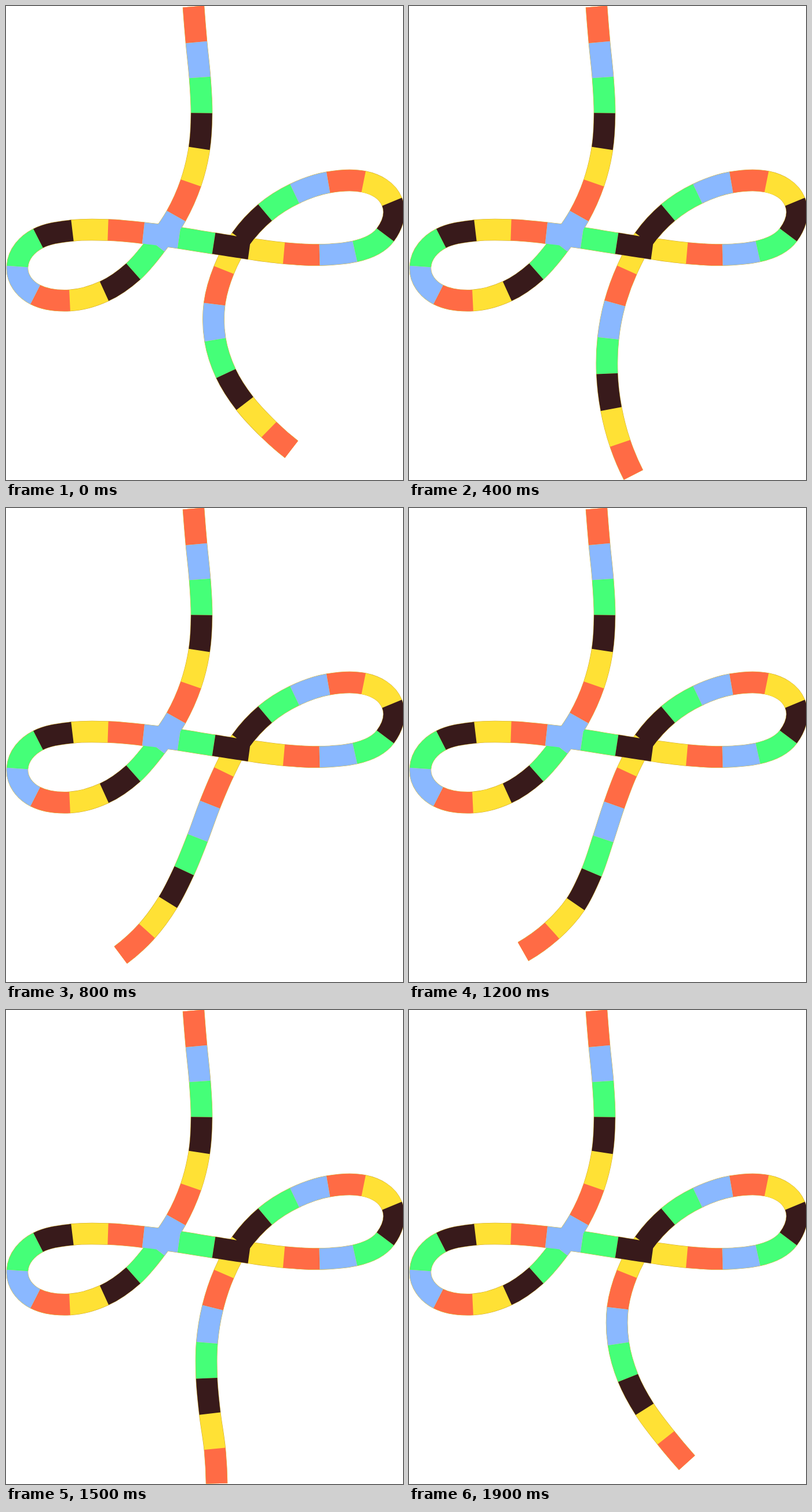
An HTML page that plays this animation: 685x817 px, repeating every 2 s.

```html
<!DOCTYPE html>
<html lang="en">
<head>
<meta charset="utf-8">
<title>Swinging ribbon</title>
<style>
  html, body { margin: 0; width: 100%; height: 100%; overflow: hidden; background: #fff; }
  svg { display: block; width: 100%; height: 100%; }
  path { fill: none; stroke-width: 36.6; }
  .edge { stroke: #c9a227; stroke-width: 37.6; }
</style>
</head>
<body>
<svg id="stage" viewBox="0 0 685 817"></svg>
<script>
const LOOP = 2000, STEP = 100, BLOCK = 61.2;

// Colour joints along the fixed part: x, y and, in tight bends, a heading in degrees.
const body = [
  [323.5, 1], [328.5, 62.5], [334.5, 123], [337.5, 184.5], [333.5, 245.5], [319, 305],
  [293.5, 362], [259, 412], [219.7, 457.5], [169.5, 491.7], [110, 507.5], [50.5, 497.5, 207],
  [19.5, 449, -86], [55.5, 400.5, -27], [114.5, 387], [176, 386], [237, 391.2], [298.5, 399.7],
  [358.5, 409.2], [420, 418.5], [479.5, 426], [541, 429], [602, 423, -12.5], [654.5, 394.5],
  [666, 337.5], [617, 302.7, 191.5], [556, 304], [498, 323.5], [447, 356], [405, 401.6], [376, 455]
];

// Tail poses: time, lean of each block from straight down in degrees, length of the last block.
const right = [-15.5, 1.1, 17.7, 32.3, 42.7, 48.9, 51.7];
const left = [-22.8, -19.8, -22, -29.5, -43.5, -58, 61.6];
const poses = [
  [0, ...right],
  [100, ...right],
  [400, -19.9, -10.8, -1.8, 6.6, 14.6, 22.9, 59],
  [600, -22, -19, -16.5, -13.5, -12.5, -15.2, 59],
  [800, -23.2, -20.3, -22.3, -27.2, -36.3, -47.6, 61.6],
  [900, ...left],
  [1100, ...left],
  [1200, -21.1, -18, -19, -26.7, -41.7, -54.2, 61.6],
  [1500, -18.4, -9.3, -0.5, 5.2, 7.9, 3.2, 60],
  [1900, -15.1, 1.2, 15.7, 28, 36.7, 40.3, 56.4],
  [LOOP, ...right]
];

// Paint order; "every" is the block's place in the five-colour cycle.
const inks = [
  { color: '#ff6b45', every: 0 },
  { color: '#45ff78', every: 2 },
  { color: '#8ab8ff', every: 1 },
  { color: '#381a1b', every: 3 }
];

const stage = document.getElementById('stage');
function addPath(color) {
  const p = document.createElementNS('http://www.w3.org/2000/svg', 'path');
  if (color) p.setAttribute('stroke', color);
  else p.setAttribute('class', 'edge');
  return stage.appendChild(p);
}
const edge = addPath();
const base = addPath('#ffe135');
inks.forEach(ink => { ink.path = addPath(ink.color); });

const rad = deg => deg * Math.PI / 180;
const unit = (x, y) => { const d = Math.hypot(x, y); return [x / d, y / d]; };

function slope(i, k) {
  const a = poses[Math.max(i - 1, 0)], b = poses[Math.min(i + 1, poses.length - 1)];
  return (b[k] - a[k]) / (b[0] - a[0]);
}

function poseAt(t) {
  let i = 0;
  while (i < poses.length - 2 && poses[i + 1][0] <= t) i++;
  const a = poses[i], b = poses[i + 1], span = b[0] - a[0], u = (t - a[0]) / span;
  return a.slice(1).map((v, n) => {
    const k = n + 1;
    if (v === b[k]) return v;
    const w = u * u * (3 - 2 * u);
    return v + (b[k] - v) * w
      + span * u * (1 - u) * ((1 - u) * slope(i, k) - u * slope(i + 1, k));
  });
}

function joints(t) {
  const pose = poseAt(t), last = pose.pop(), pts = body.slice();
  let [x, y] = pts[pts.length - 1];
  pose.forEach((lean, i) => {
    const len = i === pose.length - 1 ? last : BLOCK;
    x += len * Math.sin(rad(lean));
    y += len * Math.cos(rad(lean));
    pts.push([x, y]);
  });
  return pts;
}

// Mirror a heading across a chord, so the end block bends as an arc.
function mirror(h, c) {
  const d = 2 * (h[0] * c[0] + h[1] * c[1]);
  return [d * c[0] - h[0], d * c[1] - h[1]];
}

function headings(pts) {
  const n = pts.length - 1;
  const chord = i => unit(pts[i + 1][0] - pts[i][0], pts[i + 1][1] - pts[i][1]);
  const out = pts.map(([x, y, deg], i) => {
    if (deg !== undefined) return [Math.cos(rad(deg)), Math.sin(rad(deg))];
    if (i === 0 || i === n) return null;
    return unit(pts[i + 1][0] - pts[i - 1][0], pts[i + 1][1] - pts[i - 1][1]);
  });
  out[0] = mirror(out[1], chord(0));
  out[n] = mirror(out[n - 1], chord(n - 1));
  return out;
}

const fmt = (x, y) => x.toFixed(2) + ' ' + y.toFixed(2) + ' ';

function curve(p, q, hp, hq) {
  const dx = q[0] - p[0], dy = q[1] - p[1], c = Math.hypot(dx, dy);
  const reach = h => 2 * c / (3 * (1 + (h[0] * dx + h[1] * dy) / c));
  const a = reach(hp), b = reach(hq);
  return 'C' + fmt(p[0] + hp[0] * a, p[1] + hp[1] * a)
    + fmt(q[0] - hq[0] * b, q[1] - hq[1] * b) + fmt(q[0], q[1]);
}

function draw(t) {
  const pts = joints(t), dirs = headings(pts);
  const move = i => 'M' + fmt(pts[i][0], pts[i][1]);
  const blocks = pts.slice(1).map((q, i) => curve(pts[i], q, dirs[i], dirs[i + 1]));
  const whole = move(0) + blocks.join('');
  edge.setAttribute('d', whole);
  base.setAttribute('d', whole);
  for (const { path, every } of inks) {
    path.setAttribute('d', blocks.map((b, i) => i % 5 === every ? move(i) + b : '').join(''));
  }
}

const start = performance.now();
let shown = -1;
function tick(now) {
  const t = Math.floor((Math.max(now - start, 0) % LOOP) / STEP) * STEP;
  if (t !== shown) draw(shown = t);
  requestAnimationFrame(tick);
}
tick(start);
</script>
</body>
</html>
```
